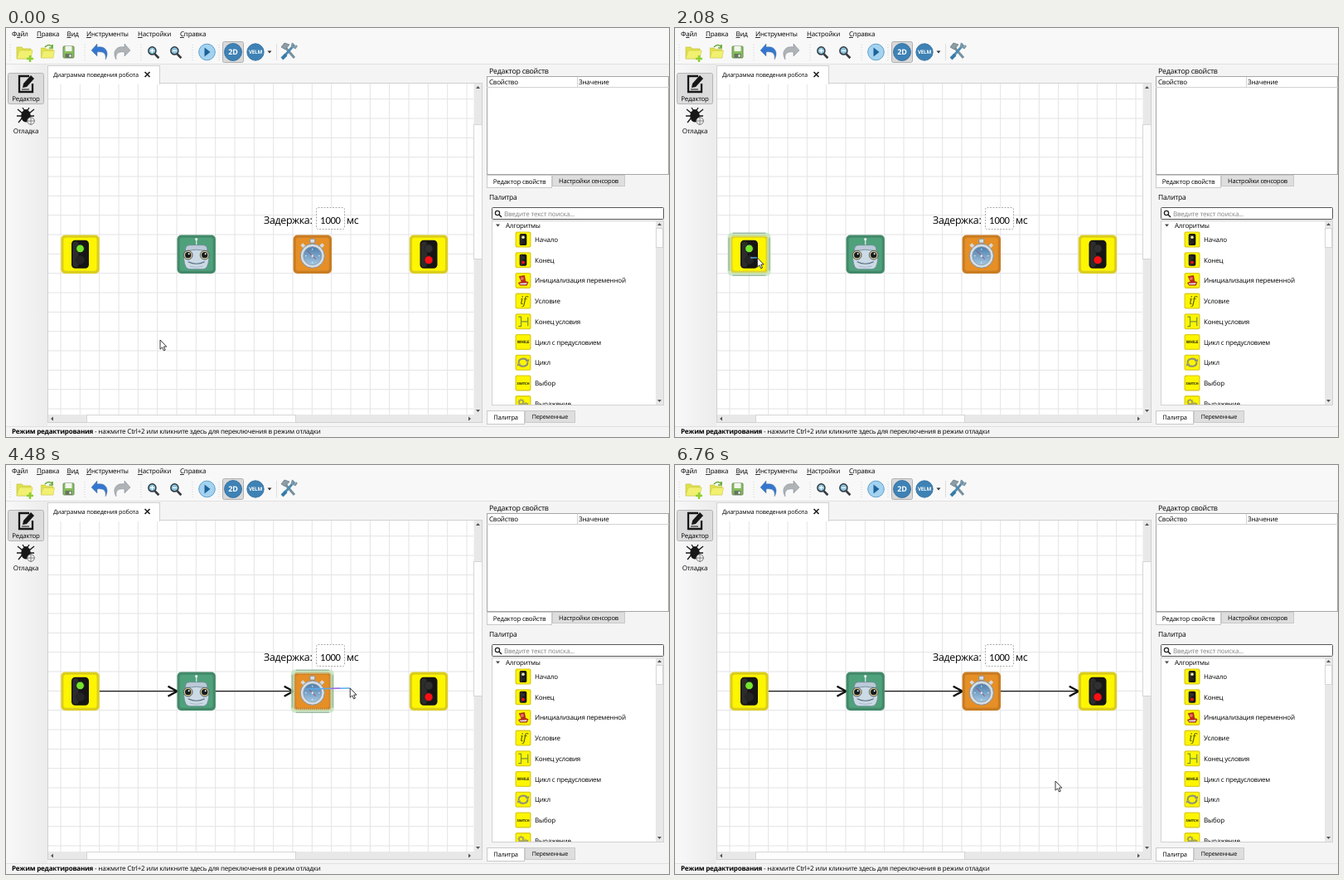
Animation, 800 px wide and 493 px high, one loop 6.8 s. Source, as an HTML page:

```html
<!DOCTYPE html>
<html lang="ru">
<head>
<meta charset="utf-8">
<style>
html, body { margin: 0; height: 100%; overflow: hidden; background: #f0f0f0; }
svg { display: block; width: 100vw; height: 100vh; }
text { font-family: "Open Sans", "Noto Sans", sans-serif; letter-spacing: -.025em; text-rendering: geometricPrecision; white-space: pre; }
</style>
</head>
<body>
<svg id="stage" viewBox="0 0 800 493"></svg>
<script>
const rect = (x, y, w, h, fill, stroke = 'none', rx = 0, more = '') =>
  `<rect x="${x}" y="${y}" width="${w}" height="${h}" fill="${fill}" stroke="${stroke}" rx="${rx}" ${more}/>`;
const disc = (x, y, r, fill, stroke = 'none', w = 1) =>
  `<circle cx="${x}" cy="${y}" r="${r}" fill="${fill}" stroke="${stroke}" stroke-width="${w}"/>`;
const line = (d, stroke, w = 1, more = '') =>
  `<path d="${d}" fill="none" stroke="${stroke}" stroke-width="${w}" ${more}/>`;
const fill = (d, color, stroke = 'none', w = 1) =>
  `<path d="${d}" fill="${color}" stroke="${stroke}" stroke-width="${w}"/>`;
const text = (x, y, s, size = 8, color = '#000', more = '') =>
  `<text x="${x}" y="${y}" font-size="${size}" fill="${color}" ${more}>${s}</text>`;
const at = (x, y, body, scale = 1) => `<g transform="translate(${x} ${y}) scale(${scale})">${body}</g>`;
const mid = 'text-anchor="middle"', bold = 'font-weight="700"';

// Blocks, 46 px wide with the origin in the middle
const tile = (color, edge) => rect(-23.2, -23.2, 46.4, 46.4, edge, 'none', 5) +
  rect(-20, -20, 40, 40, color, 'none', 3);
const yellow = tile('#fdf600', '#dccd1e');
const light = (top, bottom) => yellow + rect(-10.5, -17, 21, 34, '#151515', 'none', 4.5) +
  rect(-9, -15.5, 7, 31, '#2c2c2c', 'none', 4) + disc(0, -6.8, 4.9, top, '#222') + disc(0, 7, 5.1, bottom, '#222');
const start = light('#74e52c', '#252525'), finish = light('#303030', '#fa0f13');
const robot = tile('#4fa17b', '#43896a') +
  line('M0 -9V-18', '#d4e4e8', 1.4) + disc(0, -18, 1.6, '#e7f0ef') +
  fill('M-13 -4Q-14 -11 -8 -11H8Q14 -11 13 -4Z', '#bccad8', '#6b8494', .8) +
  fill('M-14 -4Q0 -7 14 -4L15 6Q14 18 8 18H-8Q-14 18 -15 6Z', '#ccdae6', '#6b8494', .8) +
  [-10, 10].map(x => disc(x, 1, 5.4, '#d9c48e', '#4b626a') + disc(x, 1, 3.6, '#141c20') + disc(x + 1, -.5, 1, '#fff')).join('') +
  line('M-10 9Q0 14 10 9', '#566d7d', 1.1) + line('M-8 14.5Q0 17 8 14.5', '#9fb3c2', .8);
const timer = tile('#e58f26', '#c97c22') +
  rect(-3, -18.5, 6, 5, '#d8dee2', '#8b8883', 1) + line('M-13 -12L-10 -9M13 -12L10 -9', '#d5d9dc', 4) +
  disc(0, 2, 14.6, '#d5dde4', '#8a8d90') + disc(0, 2, 11, 'url(#dial)', '#8497a8', .8) +
  line('M0 -7V-5M0 9V11M-9 2H-7M7 2H9', '#e4effa', .9) +
  line('M-6 -4L1 3L4 6', '#a04a60', 1) + disc(0, 2, 1.2, '#f0e8ec');

const label = (s, size, more = bold) => yellow + text(0, 4, s, size, '#20200c', `${mid} ${more}`);
const ring = line('M-13 2C-15 -14 8 -14 12 -5M13 -2C15 14 -8 14 -12 5', '#8f9177', 5) +
  fill('M6 -3H17V-11ZM-6 3H-17V11Z', '#8f9177');
const gear = (x, y) => at(x, y, disc(0, 0, 6, 'none', '#a3a063', 4) + line('M0 -10V10M-10 0H10M-7 -7L7 7M7 -7L-7 7', '#a3a063', 3, 'stroke-dasharray="4 12"'));
const palette = [
  ['Начало', light('#e9efae', '#252525')],
  ['Конец', finish],
  ['Инициализация переменной', yellow + fill('M-12 -12L4 -15L7 2L15 5L11 14H-9L-14 7L-5 3Z', '#bd251d', '#70231b') +
    fill('M-8 -9L1 -11L2 -3L-6 -1Z', '#e87767') + fill('M-11 8L12 7L9 12H-8Z', '#dce3eb')],
  ['Условие', label('if', 32, 'font-style="italic" style="font-family:\'Noto Serif\',serif" dy="6" opacity=".7"')],
  ['Конец условия', yellow + line('M-14 -14H-6V14H-14M-6 0H14M14 -13V13', '#789338', 3)],
  ['Цикл с предусловием', label('WHILE', 11.5)],
  ['Цикл', yellow + ring],
  ['Выбор', label('SWITCH', 10)],
  ['Выражение', yellow + gear(-6, -4) + gear(8, 6)]
];

// Toolbar pictures
const folder = fill('M-9 -7H-3L-1 -5H8V7H-9Z', '#e0e04c', '#c3c340', .7) + fill('M-9 7L-6 -3H10L8 7Z', '#f2f070', '#d0cf50', .7);
const undo = fill('M-10 -2L-3 -10V-6C8 -8 12 1 7 9C8 2 5 -1 -3 0V5Z', 'currentColor', '#5c7186', .4);
const lens = sign => line('M2 3L8 9', '#343a40', 3.4) + disc(-2, -2, 5.7, '#8cc3dc', '#30383f', 1.8) +
  line(sign, '#fff', 1.4);
const badge = (x, s, size, r) => disc(x, 29, r, '#3e82b5', '#306b9a', .8) + text(x, 29 + size * .36, s, size, '#fff', `${mid} ${bold}`);
const grip = x => line(`M${x} 20V39`, '#d2d2d2', 1, 'stroke-dasharray="1 2"');
const tools = line('M-6 -7L7 8', '#78909e', 3) + line('M7 -8L-7 8', '#4b8bb5', 2.8) +
  fill('M-9 -5L-5 -10L1 -8L-4 -2Z', '#8d9ca4', '#63747e', .7) +
  line('M5 -10L4 -6L8 -4L10 -7', '#8198a4', 2.4) + line('M-8 9L-3 4', '#367ca9', 4);
const toolbar = [5, 95, 163, 225, 257].map(grip).join('') +
  at(22, 30, folder + line('M7 3V11M3 7H11', '#8dcf31', 2.5)) +
  at(50, 29, at(0, 1, folder, .85) + line('M-3 -6Q2 -11 6 -6M6 -9V-5H2', '#65aa35', 1.7)) +
  at(75.5, 29, rect(-6.5, -7, 13, 14, '#86bd5c', '#6d8d5c', 1) + rect(-4, -7, 8, 6, '#f3f5ef') + rect(-4, 2, 8, 5, '#66755f') + rect(1, 3, 2, 3, '#eee')) +
  `<g color="#3477d0">${at(113, 29, undo)}</g><g color="#b0b3b6">${at(140, 29, `<g transform="scale(-1 1)">${undo}</g>`)}</g>` +
  at(178, 29, lens('M-5 -2H1M-2 -5V1'), .8) + at(205, 29, lens('M-5 -2H1'), .8) +
  disc(242.5, 29, 9.8, '#a3d3f0', '#5f9fc9', 1) + fill('M239.5 23.5V34.5L246.5 29Z', '#1d6298') +
  rect(261.5, 16.5, 25, 25, '#d9d9d9', '#b0b0b0', 2) + badge(274, '2D', 9, 10.5) + badge(301, 'VELM', 6.2, 10.2) +
  fill('M315.5 27.5H320.5L318 30.5Z', '#333') + line('M326.5 19V39', '#dedede') + at(341, 28, tools);

const menu = [[7, 'Файл', 1], [37, 'Правка', 0], [73.5, 'Вид', 0], [97, 'Инструменты', 0], [159, 'Настройки', 0], [210, 'Справка', 0]]
  .map(([x, s, i]) => text(x, 10, `${s.slice(0, i)}<tspan text-decoration="underline">${s[i]}</tspan>${s.slice(i + 1)}`)).join('');

const sidebar = rect(2.5, 54.5, 43, 37, '#dcdcdc', '#b5b5b5', 2) +
  at(24, 67, line('M4 -9H-8V10H8V0', '#171717', 2.3) + fill('M-4 5L-3 0L6 -10L10 -6L1 4Z', '#171717') + line('M-5 7H4', '#171717', 1)) +
  text(24, 88, 'Редактор', 7.8, '#000', mid) +
  at(24, 105, line('M-10 -7L-5 -3L5 -3L10 -7M-11 1H10M-9 9L-5 4L4 4M-4 -9L-2 -6L2 -6L4 -9', '#171717', 1.3) +
    `<ellipse cy="1" rx="5.8" ry="7.5" fill="#171717"/>` + disc(6, 7, 4.3, '#ededed', '#666', .8) + line('M6 2V12M1 7H11', '#666', .7)) +
  text(24, 127, 'Отладка', 8, '#000', mid);

let grid = '';
for (let x = 66; x < 564; x += 70 / 3) grid += `M${x.toFixed(1)} 67V466`;
for (let y = 85.7; y < 466; y += 70 / 3) grid += `M51 ${y.toFixed(1)}H564`;

const arrow = (x, y, dx, dy) => fill(dy ? `M${x - 2.5} ${y - dy}H${x + 2.5}L${x} ${y + 2 * dy}Z` : `M${x - dx} ${y - 2.5}V${y + 2.5}L${x + 2 * dx} ${y}Z`, '#555');
const track = '#e8e8e8', thumb = '#fdfdfd';
const editor = rect(50.5, 66.5, 524, 409, track, '#d0d0d0') + rect(51, 67, 513.5, 399, '#fff') + line(grid, '#e3e3e6') +
  rect(50.5, 45.5, 135, 22, '#fff', '#d0d0d0') + rect(51, 66, 134, 2, '#fff') +
  text(57, 59, 'Диаграмма поведения робота', 7.3) + line('M167.5 53L173.5 59M173.5 53L167.5 59', '#222', 1.7) +
  rect(564.5, 116.5, 10, 162, thumb, '#d5d5d5') + rect(97.5, 466.5, 252, 9, thumb, '#d5d5d5') +
  arrow(569.5, 72, 0, -1) + arrow(569.5, 461, 0, 1) + arrow(56, 471, -1, 0) + arrow(559, 471, 1, 0);

const tab = (x, y, w, h, s, size, on) => rect(x + .5, y + .5, w, h, on ? '#fff' : '#dedede', '#c9c9c9') +
  text(x + w / 2 + .5, y + h / 2 + 3.2, s, size, '#000', mid);
const panel = text(583, 55, 'Редактор свойств', 8.8) +
  rect(580.5, 58.5, 219, 118, '#fff', '#a6a6a6') + line('M580 71.5H800M689.5 59V71', '#d2d2d2') +
  text(583, 68, 'Свойство') + text(691, 68, 'Значение') +
  tab(659, 177, 87, 13, 'Настройки сенсоров', 7.5) + tab(580, 177, 78, 15, 'Редактор свойств', 7.8, true) +
  text(583, 207, 'Палитра', 8.5) +
  rect(586.5, 216.5, 207, 14, '#fff', '#555', 1) + disc(593, 223, 2.6, 'none', '#222', 1.3) + line('M595 225L598 228', '#222', 1.6) +
  text(601, 227, 'Введите текст поиска...', 8, '#808080') +
  rect(586.5, 232.5, 207, 222, '#fff', '#d2d2d2') + rect(784, 233, 9, 221, track) +
  rect(784.5, 241.5, 8, 23, thumb, '#d5d5d5') + arrow(788.5, 237, 0, -1) + arrow(788.5, 449, 0, 1) +
  `<g clip-path="url(#tree)">${fill('M591 236.5H596L593.5 239.5Z', '#444')}${text(603, 240.5, 'Алгоритмы')}${
    palette.map(([name, icon], i) => at(624, 255 + i * 24.7, icon, .41) + text(638, 258 + i * 24.7, name)).join('')}</g>` +
  tab(626, 461, 60, 14, 'Переменные', 7.1) + tab(580, 461, 45, 16, 'Палитра', 7.5, true);

const Y = 272.7;
const centers = [89.5, 229.7, 369.8, 510];
const blocks = [start, robot, timer, finish].map((b, i) => at(centers[i], Y, b)).join('');
const links = centers.slice(0, 3).map((x, i) =>
  `<g id="link${i}">${line(`M${x + 23} ${Y}H${x + 116}`, '#111', 1.3)}${line(`M${x + 106} ${Y - 6}L${x + 117} ${Y}L${x + 106} ${Y + 6}`, '#111', 2.4)}</g>`).join('');
const glow = rect(-24, -24, 48, 48, 'none', '#bfe3b6', 3, 'stroke-width="4" opacity=".75"') +
  rect(-21.5, -21.5, 43, 43, 'none', '#d5e8cf', 0, 'stroke-dasharray="1.2 1.2"') +
  line('M-20 -25.5H20M-20 25.5H20M-24.5 -20V20M24.5 -20V20', '#70917e', .8);

stage.innerHTML = `<defs><clipPath id="tree"><path d="M587 233H784V454H587Z"/></clipPath>
  <linearGradient id="side"><stop stop-color="#f8f8f8"/><stop offset="1" stop-color="#ececec"/></linearGradient>
  <linearGradient id="dial" x2="0" y2="1"><stop stop-color="#4d7daa"/><stop offset="1" stop-color="#a5c8e4"/></linearGradient></defs>` +
  rect(0, 0, 800, 493, '#f4f4f4') + rect(0, 0, 800, 43.5, '#f8f8f8') + rect(0, 44, 50, 436, 'url(#side)') +
  line('M0 43.5H800M0 480.5H800', '#e0e0e0') +
  menu + toolbar + sidebar + editor + panel +
  text(7, 489, `<tspan ${bold}>Режим редактирования</tspan> - нажмите Ctrl+2 или кликните здесь для переключения в режим отладки`) +
  text(311, 235.5, 'Задержка:', 12.4) + rect(374.5, 216.5, 34, 26, '#fff', '#aaa', 2, 'stroke-dasharray="2 1.5"') +
  text(391.5, 235.5, '1000', 11, '#000', `${mid} style="font-family:Lato,sans-serif"`) + text(411, 235.5, 'мс', 12.4) +
  links + blocks + `<g id="glow">${glow}</g>` +
  line('', '#58acec', 1.3, 'id="trace"') + line('', '#b45bee', 1.3, 'id="gesture"') +
  `<g id="cursor">${fill('M0 0V11.2L2.6 8.9L4.4 12.9L6.2 12.1L4.4 8.1H7.8Z', '#fff', '#222', .9)}</g>`;

// Pointer keys: time, x, y; drags: press time, release time
const keys = [[0, 186, 376], [1300, 186, 376], [1520, 139, 342], [1840, 91, 277], [2040, 91, 277],
  [2320, 148, 276.5], [2500, 184, 275], [2600, 205, 270.5], [2640, 211, 272], [2720, 222, 273],
  [3120, 222, 273], [3260, 252, 275], [3320, 270, 273], [3600, 330, 273], [3760, 362, 270],
  [4200, 362, 270], [4480, 415, 269], [4880, 505, 271], [5080, 505, 271], [5560, 459, 381], [6800, 459, 381]];
const drags = [[2040, 2720], [3120, 3760], [4200, 4880]];
const el = id => document.getElementById(id);

function pointer(t) {
  const i = keys.findIndex(k => k[0] > t), [t0, x0, y0] = keys[i - 1], [t1, x1, y1] = keys[i];
  const p = (t - t0) / (t1 - t0);
  return [x0 + (x1 - x0) * p, y0 + (y1 - y0) * p];
}

function draw(now) {
  const t = Math.max(0, now) % 6800, tip = pointer(t);
  el('cursor').setAttribute('transform', `translate(${tip})`);
  drags.forEach((d, i) => el('link' + i).setAttribute('visibility', t >= d[1] ? 'visible' : 'hidden'));
  const active = drags.findIndex(([a, b]) => t >= a && t < b);
  let path = '';
  if (active >= 0) {
    const points = keys.filter(k => k[0] >= drags[active][0] && k[0] <= t).map(k => k.slice(1));
    path = 'M' + [...points, tip].join('L');
    // The violet stroke leaves both ends of the blue one free
    const length = Math.hypot(tip[0] - points[0][0], tip[1] - points[0][1]);
    el('gesture').setAttribute('stroke-dasharray', `0 30 ${Math.max(0, length - 42)} 999`);
    el('glow').setAttribute('transform', `translate(${centers[active]} ${Y})`);
  }
  el('glow').setAttribute('visibility', active >= 0 ? 'visible' : 'hidden');
  el('trace').setAttribute('d', path);
  el('gesture').setAttribute('d', path);
  requestAnimationFrame(draw);
}
draw(performance.now());
</script>
</body>
</html>
```
